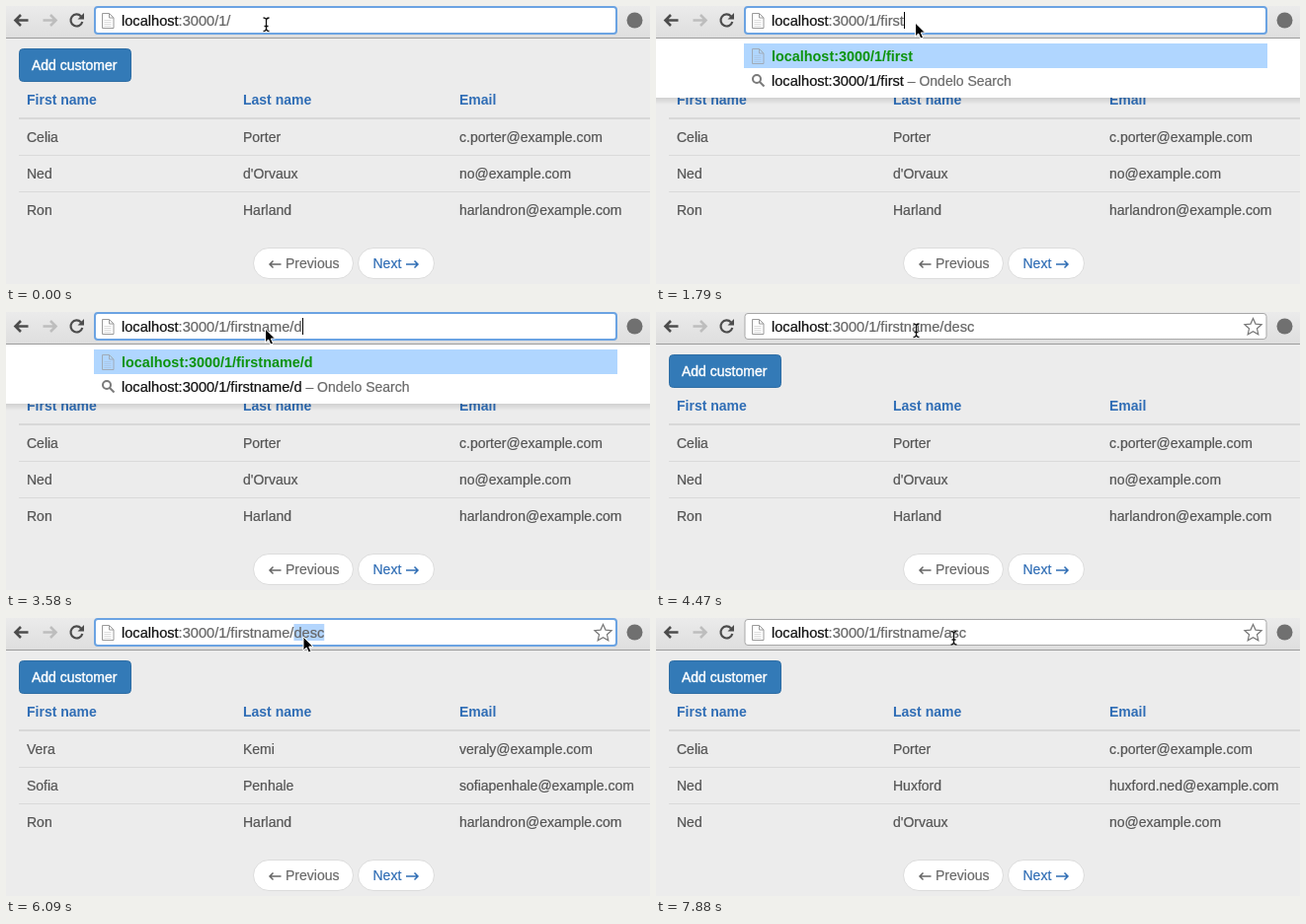
Animation, 652 px wide and 282 px high, one loop 8 s. Source, as an HTML page:

```html
<!DOCTYPE html>
<html lang="en">
<head>
<meta charset="utf-8">
<title>Sorting by address</title>
<style>
html, body { margin: 0; width: 100%; height: 100%; overflow: hidden; background: #ececec; }
svg { display: block; }
text {
  font: 14px "Liberation Sans", Arial, sans-serif; white-space: pre;
  color: #555; fill: currentColor; stroke: currentColor; stroke-width: .22;
}
tspan { fill: currentColor; stroke: currentColor; }
.url { font-size: 14.6px; color: #666; }
.host { color: #111; }
.hit { font-size: 14.4px; font-weight: bold; color: #0c930c; stroke: none; }
.link { color: #2f6db5; }
.head { font-weight: bold; stroke: none; }
.icon { fill: none; stroke: #4c4c4c; stroke-width: 2.6; }
.thin { fill: none; stroke: #666; stroke-width: 1.5; }
</style>
</head>
<body>
<svg width="652" height="282" viewBox="0 0 652 282">
  <defs>
    <linearGradient id="bar" x2="0" y2="1">
      <stop stop-color="#ebebeb"/><stop offset="1" stop-color="#dedede"/>
    </linearGradient>
    <linearGradient id="shade" x2="0" y2="1">
      <stop stop-opacity=".12"/><stop offset="1" stop-opacity="0"/>
    </linearGradient>
    <g id="doc" stroke="#9a9a9a" fill="none">
      <path d="M97.5 7.5h7l4.5 4.5v10.5h-11.5zM104.5 7.5v4.5h4.5"/>
      <path d="M99.5 14.5h7M99.5 16.5h7M99.5 18.5h7M99.5 20.5h7" opacity=".35"/>
    </g>
    <g id="beam" fill="none">
      <path d="M-3-6.5Q0-6.5 0-4Q0-6.5 3-6.5M0-4V4M-3 7Q0 7 0 4Q0 7 3 7M-2 2H2" stroke="#fff" stroke-width="2.6" opacity=".6"/>
      <path d="M-3-6.5Q0-6.5 0-4Q0-6.5 3-6.5M0-4V4M-3 7Q0 7 0 4Q0 7 3 7M-2 2H2" stroke="#111" stroke-width="1.3"/>
    </g>
    <path id="arrow" d="M0 0V14L3.2 11L5.4 16L8 15L5.8 10H10z" fill="#000" stroke="#fff"/>
  </defs>

  <rect x="13.5" y="43.5" width="113" height="33" rx="4" fill="#337ab7" stroke="#2e6da4"/>
  <text x="26" y="65" style="color:#fff;stroke-width:.4">Add customer</text>
  <text class="link head" x="21" y="100">First name</text>
  <text class="link head" x="240" y="100">Last name</text>
  <text class="link head" x="459" y="100">Email</text>
  <path d="M13 114H652" stroke="#d8d8d8" stroke-width="2"/>
  <path d="M13 151.5H652M13 188.5H652" stroke="#dadada"/>
  <g id="rows"></g>
  <g fill="#fff" stroke="#dcdcdc">
    <rect x="250.5" y="245.5" width="101" height="31" rx="15.5"/>
    <rect x="356.5" y="245.5" width="77" height="31" rx="15.5"/>
  </g>
  <path class="thin" d="M278.5 262H267M270.5 258.5L267 262L270.5 265.5"/>
  <text x="283" y="266" style="color:#6a6a6a">Previous</text>
  <text class="link" x="371.5" y="266">Next</text>
  <path class="thin" d="M405 262H417M413.5 258.5L417 262L413.5 265.5" style="stroke:#2f6db5"/>

  <rect width="652" height="32" fill="url(#bar)"/>
  <path d="M0 32.5H652" stroke="#9c9c9c"/>
  <path class="icon" d="M22.5 14.5H10M15 9L9.5 14.5L15 20"/>
  <path class="icon" d="M37.5 14.5H50M45 9L50.5 14.5L45 20" style="stroke:#bdbdbd"/>
  <path class="icon" d="M76 10.5A6 6 0 1 0 77.3 16" style="stroke-width:2.2"/>
  <path d="M79 7V13.5H72.5z" fill="#4c4c4c"/>
  <circle cx="636.5" cy="14.5" r="8" fill="#707070"/>
  <rect id="box" x="90" width="528" rx="3" fill="#fff"/>
  <use href="#doc"/>
  <path id="star" d="M604.5 6.5l2.5 5.6 6.1.6-4.6 4.1 1.3 6-5.3-3.1-5.3 3.1 1.3-6-4.6-4.1 6.1-.6z" fill="#fff" stroke="#777" stroke-width="1.2"/>
  <rect id="sel" y="6" height="17" fill="#b3d5fd"/>
  <text id="url" class="url" x="117" y="20"><tspan class="host">localhost</tspan><tspan id="path"></tspan></text>
  <rect id="caret" y="6" width="1" height="17" fill="#000"/>

  <g id="menu">
    <rect y="33" width="652" height="60" fill="#fff"/>
    <rect y="93" width="652" height="7" fill="url(#shade)"/>
    <rect x="89" y="38" width="530" height="25" fill="#b0d6ff"/>
    <use href="#doc" y="36" opacity=".7"/>
    <text id="hit" class="hit" x="117" y="56"></text>
    <g class="icon" style="stroke:#7a7a7a;stroke-width:2">
      <circle cx="102" cy="74" r="4"/><path d="M105 77L109.5 81.5"/>
    </g>
    <text x="117" y="81"><tspan id="query" class="url host"></tspan><tspan style="color:#6a6a6a"> – Ondelo Search</tspan></text>
  </g>
  <use id="cursor"/>
</svg>
<script>
const $ = id => document.getElementById(id);
const LOOP = 8000;

const celia = ["Celia", "Porter", "c.porter"];
const ned = ["Ned", "d'Orvaux", "no"];
const nedH = ["Ned", "Huxford", "huxford.ned"];
const ron = ["Ron", "Harland", "harlandron"];
const sofia = ["Sofia", "Penhale", "sofiapenhale"];
const vera = ["Vera", "Kemi", "veraly"];

// Each step changes part of the state from its time on.
const steps = [[0, {
  path: "", rows: [celia, ned, ron], focus: true, star: false,
  menu: false, caret: false, sel: null, cursor: ["beam", 263.5, 18.5]
}]];
const at = (time, change) => steps.push([time, change]);
const type = (before, keys, times) =>
  times.forEach((time, i) => at(time, { path: before + keys.slice(0, i + 1) }));

at(450, { caret: true });
at(1050, { menu: true, cursor: ["arrow", 262.5, 17] });
type("", "firstname/desc",
  [1050, 1200, 1340, 1490, 1790, 2240, 2390, 2830, 2980, 3280, 3580, 3720, 3870, 4320]);
at(4460, { menu: false, caret: false, focus: false, star: true, cursor: ["beam", 263.5, 18.5] });
at(5060, { rows: [vera, sofia, ron] });
at(5210, { cursor: ["beam", 272, 18.5] });
at(5360, { cursor: ["beam", 286.5, 19] });
at(5500, { cursor: ["beam", 296, 19.5] });
at(5650, { cursor: ["beam", 301.5, 20] });
at(5800, { focus: true, sel: "all" });
at(5950, { sel: "desc" });
at(6090, { cursor: ["arrow", 301, 19] });
at(6390, { menu: true, caret: true, star: false, sel: null });
type("firstname/", "asc", [6390, 6690, 7290]);
at(7590, { menu: false, caret: false, focus: false, star: true });
at(7880, { rows: [celia, nedH, ned], cursor: ["beam", 301.5, 20] });

const set = (id, attrs) => {
  for (const k in attrs) $(id).setAttribute(k, attrs[k]);
};
const show = (id, on) => set(id, { visibility: on ? "visible" : "hidden" });

function draw(s) {
  const tail = ":3000/1/" + s.path, full = "localhost" + tail;
  $("path").textContent = tail;
  $("hit").textContent = $("query").textContent = full;
  $("rows").innerHTML = s.rows.map(([first, last, mail], i) =>
    [first, last, mail + "@example.com"].map((cell, j) =>
      `<text x="${21 + 219 * j}" y="${138 + 37 * i}">${cell}</text>`).join("")).join("");

  const width = $("url").getComputedTextLength();
  set("caret", { x: Math.round(117 + width) });
  if (s.sel) {
    const from = s.sel === "all" ? 0 : $("url").getSubStringLength(0, full.length - s.sel.length);
    set("sel", { x: 117 + from, width: width - from });
  }
  set("box", s.focus
    ? { y: 1, height: 27, stroke: "#6ba3e2", "stroke-width": 2 }
    : { y: 1.5, height: 26, stroke: "#a8a8a8", "stroke-width": 1 });
  for (const id of ["menu", "caret", "star", "sel"]) show(id, s[id]);
  const [shape, x, y] = s.cursor;
  set("cursor", { href: "#" + shape, x, y });
}

let shown = 0;
function frame() {
  const t = performance.now() % LOOP;
  const past = steps.filter(([time]) => time <= t);
  if (past.length !== shown) {
    shown = past.length;
    draw(Object.assign({}, ...past.map(([, change]) => change)));
  }
  requestAnimationFrame(frame);
}
frame();
</script>
</body>
</html>
```
